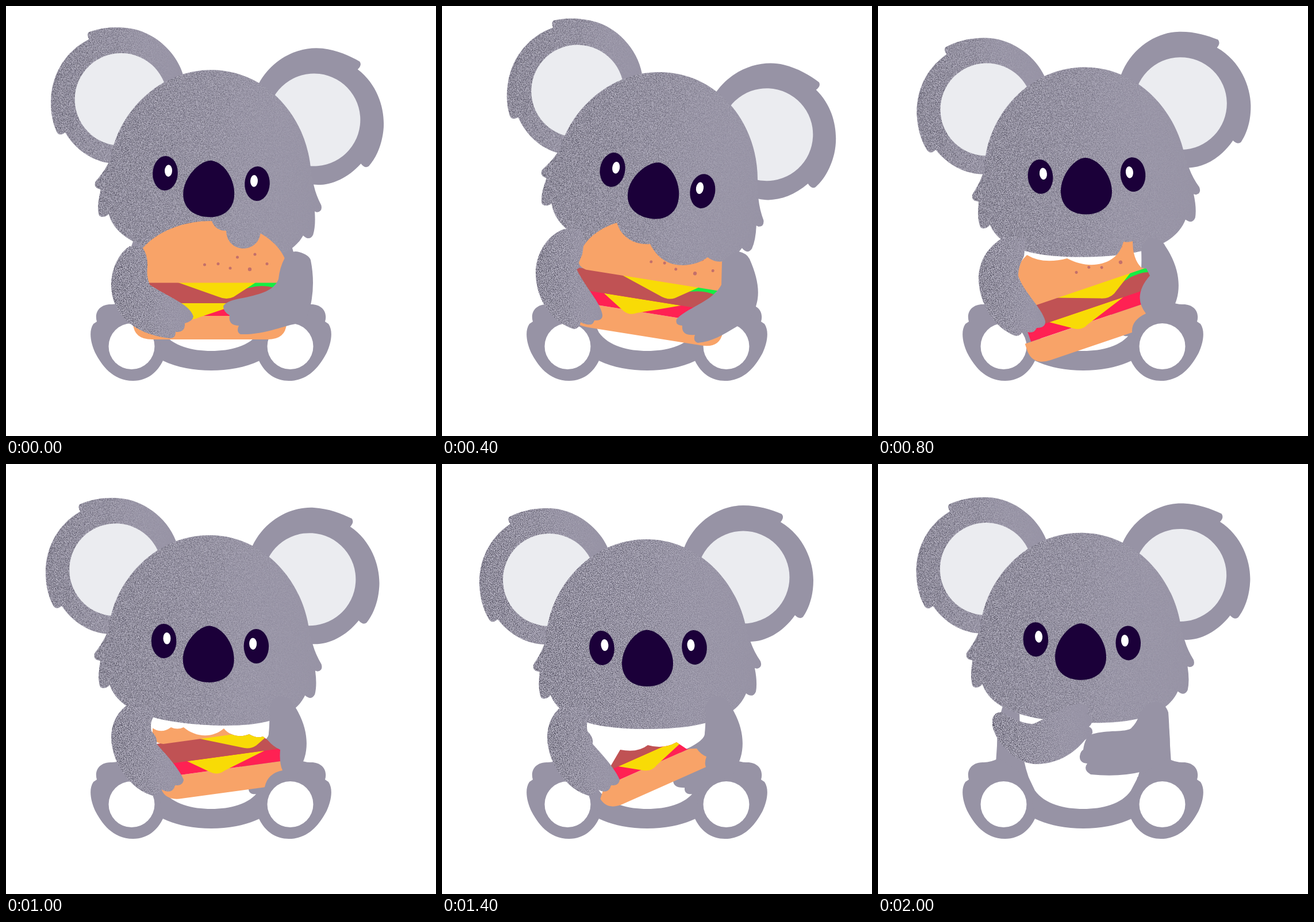
These frames come from a looping animation (748 px wide and 748 px high, 2.2 s). An HTML page:

```html
<!DOCTYPE html>
<html lang="en">
<head>
<meta charset="utf-8">
<title>Koala eating a burger</title>
<style>
  html, body { margin: 0; width: 100%; height: 100%; overflow: hidden; background: #fff; }
  svg { display: block; width: 100vw; height: 100vh; }
  .fur { fill: #9793a5; }
  .grain { fill: url(#fade); filter: url(#speckle); }
  .inner-ear { fill: #ebecf0; }
  .ink { fill: #1b0039; }
  .white { fill: #fff; }
  .bun { fill: #f8a368; }
  .cheese { fill: #f8db06; }
  .patty { fill: #c05254; }
  .tomato { fill: #ff2153; }
  .lettuce { fill: #14ee43; }
  .seeds { fill: #c4706a; }
</style>
</head>
<body>
<svg viewBox="0 0 748 748">
  <defs>
    <linearGradient id="fade">
      <stop offset="0" stop-color="#000"/>
      <stop offset=".5" stop-color="#000" stop-opacity=".75"/>
      <stop offset="1" stop-color="#000" stop-opacity="0"/>
    </linearGradient>
    <filter id="speckle" x="0" y="0" width="1" height="1" color-interpolation-filters="sRGB">
      <feTurbulence type="fractalNoise" baseFrequency=".85" numOctaves="2" seed="4" result="noise"/>
      <feColorMatrix in="noise" values="0 0 0 0 .35  0 0 0 0 .34  0 0 0 0 .40  9 0 0 0 -4.4"/>
      <feComposite in2="SourceGraphic" operator="arithmetic" k2="1" k3="1" k4="-1" result="mix"/>
      <feColorMatrix in="mix" values="0 0 0 0 .35  0 0 0 0 .34  0 0 0 0 .40  0 0 0 1 0"/>
      <feComposite in2="SourceGraphic" operator="in" result="dark"/>
      <feColorMatrix in="noise" values="0 0 0 0 .73  0 0 0 0 .72  0 0 0 0 .77  -9 0 0 0 4.6"/>
      <feComposite in2="SourceGraphic" operator="in" result="light"/>
      <feMerge><feMergeNode in="light"/><feMergeNode in="dark"/></feMerge>
    </filter>
    <clipPath id="bites"><path id="biteShape"/></clipPath>
    <path id="earShape" d="M288 145C270 105 225 76 183 77C155 77 135 83 117 92Q113 97 119 104C80 130 65 170 65 205C65 235 74 258 83 272Q88 278 97 270C118 298 150 314 181 314L240 230Z"/>
    <path id="headShape" d="M356 131C442 131 514 200 530 290L537 310Q543 327 554 343Q558 354 548 356L544 355Q549 380 546 396Q541 408 529 399C510 446 445 461 357 461C270 461 206 446 189 402Q181 411 173 407Q166 395 170 361Q157 361 159 349Q172 330 178 314L182 290C194 205 264 131 356 131Z"/>
    <g id="foot">
      <path class="fur" d="M158 549C153 532 164 518 184 519Q196 519 210 512L262 545L273 617C262 640 243 652 221 652C185 652 166 624 155 603C148 588 143 566 152 553Z"/>
      <circle class="white" cx="218.5" cy="592" r="40"/>
    </g>
  </defs>

  <path class="fur" d="M225 400Q207 440 207 490L205 520L273 617C298 629 328 634 357 634C386 634 416 629 441 617L510 520L508 490Q508 440 490 400Z"/>
  <path class="white" d="M246 420Q246 500 262 545L273 568C290 592 325 600 357 600C389 600 424 592 440 568L452 545Q466 500 464 420Z"/>
  <use href="#foot"/>
  <use href="#foot" transform="matrix(-1 0 0 1 713 0)"/>

  <g id="head">
    <use href="#earShape" class="fur"/>
    <use href="#earShape" class="grain"/>
    <circle class="inner-ear" cx="186.5" cy="201.5" r="80.5"/>
    <path class="fur" d="M421 146C440 98 485 72 524 72C550 72 572 79 591 87Q596 93 589 101C630 125 646 170 646 202C646 232 637 253 628 266Q622 271 614 263C592 294 562 309 536 309L480 225Z"/>
    <circle class="inner-ear" cx="524" cy="197" r="80.5"/>
    <use href="#headShape" class="fur"/>
    <use href="#headShape" class="grain"/>
    <g class="ink">
      <ellipse cx="278" cy="320" rx="21.8" ry="30" transform="rotate(-4 278 320)"/>
      <ellipse cx="439" cy="319" rx="21.8" ry="30" transform="rotate(-4 439 319)"/>
      <path d="M356 288.5C378 289 402 318 402 347C402 372 383 387 357 387C331 387 313 372 313 347C313 318 338 289 356 288.5Z"/>
    </g>
    <g class="white">
      <ellipse cx="283" cy="315" rx="6.5" ry="10.3" transform="rotate(-5 283 315)"/>
      <ellipse cx="433" cy="315" rx="6.5" ry="10.3" transform="rotate(-5 433 315)"/>
    </g>
  </g>

  <g id="burgerLayer" clip-path="url(#bites)">
    <g id="burger">
      <path class="bun" d="M221 539H488V553Q486 580 455 580H254Q223 580 221 553Z"/>
      <path class="tomato" d="M232 516H478V539H232Z"/>
      <path class="cheese" id="lowCheese" d="M273 517H409L335 542Q322 549 310 541Z"/>
      <path class="patty" d="M224 480H430L466 489Q476 505 462 517H244Q218 508 217 486Z"/>
      <path class="lettuce" d="M430 480H473L466 490Q446 484 424 490L412 492Z"/>
      <path class="cheese" d="M298 480.5H435L396 506Q384 512 370 506Z"/>
      <path class="bun" d="M236 481.5Q218 478 220 460C226 410 290 374 355 374C420 374 480 405 490 455Q492 478 474 481.5Z"/>
      <g class="seeds">
        <circle cx="345.5" cy="450" r="2.5"/><circle cx="369" cy="448.5" r="2.5"/>
        <circle cx="390" cy="456" r="2.5"/><circle cx="402.5" cy="437" r="2.5"/>
        <circle cx="424" cy="458" r="3.2"/><circle cx="433" cy="432" r="2.5"/>
        <circle cx="454" cy="448.5" r="2.5"/>
      </g>
    </g>
  </g>
  <g id="leftArm"><path class="fur"/><path class="grain"/></g>
  <path id="rightArm" class="fur"/>
</svg>

<script>
const STEP = 200;
const $ = id => document.getElementById(id);

const leftArms = {
  hold: 'M215 418C195 430 183 460 183 485C183 530 215 570 285 578Q295 578 295 567Q312 568 311 552Q325 548 326 540C320 520 290 510 250 485Q244 470 246 455Q247 430 235 418Z',
  lift: 'M212 388C180 400 163 435 163 463C163 510 190 550 230 562Q240 560 241 550Q262 560 265 547Q280 548 279 537C275 515 250 490 234 458Q238 445 244 432Q250 400 240 388Z',
  tilt: 'M216 404C190 420 175 445 175 475C176 515 200 560 240 574Q250 574 252 563Q270 574 276 560Q292 560 291 548C285 525 255 500 244 470Q243 455 254 435L257 404Z',
  low: 'M210 420C190 435 184 455 183 475C184 520 215 565 255 577Q266 576 270 566Q290 576 294 559Q308 560 309 549C300 528 277 504 262 487Q264 475 253 465Q250 450 256 441L250 420Z',
  reach: 'M222 410C200 425 194 450 194 480C195 530 240 570 300 573Q308 570 305 560Q326 564 325 545Q340 545 338 535C325 515 290 500 264 485Q255 470 257 440L258 420Z',
  fold: 'M199 443Q204 430 216 432C230 440 250 452 270 452C300 440 330 418 345 418Q360 415 366 424Q368 430 362 434Q374 440 372 450Q370 455 367 457Q374 460 373 468Q370 474 360 480C340 505 310 522 275 522C240 522 205 485 199 455Z'
};

const rightArms = {
  hold: 'M485 438Q495 424 510 428Q527 433 530 442Q538 482 530 520L520 552C490 550 460 572 408 571Q400 567 405 556Q386 556 389 538Q378 532 378 522C385 511 405 510 425 505C455 498 468 490 474 475Q476 455 485 438Z',
  lift: 'M487 445Q505 428 516 427Q530 430 535 440Q555 485 548 515Q545 530 535 545C505 560 480 583 445 586Q436 583 440 572Q416 574 418 556Q405 555 408 545C425 525 470 515 486 485Z',
  low: 'M458 425Q463 404 478 404Q494 405 500 418C525 455 527 490 518 515L505 545Q470 550 437 574Q421 576 422 563Q402 564 402 550L415 500C435 492 458 480 457 468Q459 450 458 425Z',
  reach: 'M466 433Q475 417 492 417C508 435 520 480 515 512L508 545Q470 550 430 578Q415 585 402 583Q396 580 399 569Q379 571 380 552Q368 548 372 545L440 490Q458 475 455 455Z',
  fold: 'M453 440Q460 420 480 414Q498 412 505 432Q508 470 506 500Q500 525 460 535Q420 545 370 540Q356 532 364 521Q350 520 351 508Q352 500 357 497Q360 474 372 470C400 462 430 467 440 460Q450 450 453 440Z'
};

const bites = {
  first: 'M200 340L358 374Q364 391 383 391C384 432 442 432 443 391L500 370V600H200Z',
  second: 'M200 360L303 372C310 405 338 416 362 414C375 440 395 451 420 451Q445 450 462 437Q475 447 490 444L500 600H200Z',
  third: 'M257 421Q285 438 327 427C365 448 415 440 425 398Q433 400 441 397Q441 428 456 443L465 445L471 457Q440 492 464 523Q438 535 440 556L380 620H230V440Z',
  fourth: 'M250 455Q268 472 287 458Q298 463 309 458C330 476 360 477 379 460C390 474 410 476 423 470Q436 478 447 474L455 480Q465 492 477 497Q475 520 481 533Q455 538 450 562L420 600H260Z',
  fifth: 'M293 526L310 497Q340 503 358 489Q385 497 408 484L426 496Q432 495 443 495Q450 505 460 509Q456 520 459 527L440 560L320 620L270 600Z',
  sixth: 'M293 493Q322 495 336 478C345 497 365 500 384 488C400 500 435 500 446 475Q472 478 471 449L482 446Q486 456 495 458Q492 466 494 478L350 570L280 520Z',
  last: 'M270 600L296 556Q325 560 340 540Q350 552 368 546Q366 560 374 570L320 610Z'
};

// head: x, y, angle; burger: x, y, angle of the upper cheese corner
const pose = (head, left, right, bite, burger, extra) => ({ head, left, right, bite, burger, ...extra });
const front = { rightInFront: true };
const poses = [
  pose([357, 300, 6.8], 'hold', 'hold', 'first', [298, 481, 0], front),
  pose([367, 299, 1], 'hold', 'hold', 'first', [303, 492, -14], { ...front, biteMove: 'translate(303 492) rotate(-14) translate(-298 -481)' }),
  pose([375, 303.5, 13.7], 'lift', 'lift', 'second', [312, 468, 9.1], front),
  pose([359.5, 290, -1], 'tilt', 'low', 'third', [308, 496, -18.7]),
  pose([363, 295, -1], 'tilt', 'low', 'third', [310, 508, -18.7], { biteMove: 'translate(2 12)' }),
  pose([355, 312.5, 3.6], 'low', 'low', 'fourth', [335, 478, -7.8]),
  pose([359.5, 297, -0.8], 'low', 'low', 'fourth', [335, 478, -7.8]),
  pose([358.5, 319.5, 0], 'low', 'low', 'fifth', [315, 483, -24]),
  pose([353.5, 301.8, 5.7], 'reach', 'reach', 'sixth', [358, 440, -30.5], { plain: true }),
  pose([357, 312, 0.6], 'low', 'low', 'last', [315, 483, -24], { plain: true }),
  pose([354.8, 308.3, 2.6], 'fold', 'fold')
];

const place = ([x, y, angle], px, py) =>
  `translate(${x} ${y}) rotate(${angle}) translate(${-px} ${-py})`;

function show(p) {
  $('head').setAttribute('transform', place(p.head, 358.5, 319.5));
  for (const path of $('leftArm').children) path.setAttribute('d', leftArms[p.left]);
  $('rightArm').setAttribute('d', rightArms[p.right]);

  const layer = $('burgerLayer');
  layer.parentNode.insertBefore($('rightArm'), p.rightInFront ? $('leftArm') : layer);
  layer.style.display = p.burger ? '' : 'none';
  if (!p.burger) return;
  $('burger').setAttribute('transform', place(p.burger, 298, 481));
  $('lowCheese').style.display = p.plain ? 'none' : '';
  $('biteShape').setAttribute('d', bites[p.bite]);
  $('biteShape').setAttribute('transform', p.biteMove || 'translate(0 0)');
}

const start = performance.now();
let current = -1;
function tick() {
  const index = Math.floor((performance.now() - start) / STEP) % poses.length;
  if (index !== current) show(poses[current = index]);
  requestAnimationFrame(tick);
}
tick();
</script>
</body>
</html>
```
